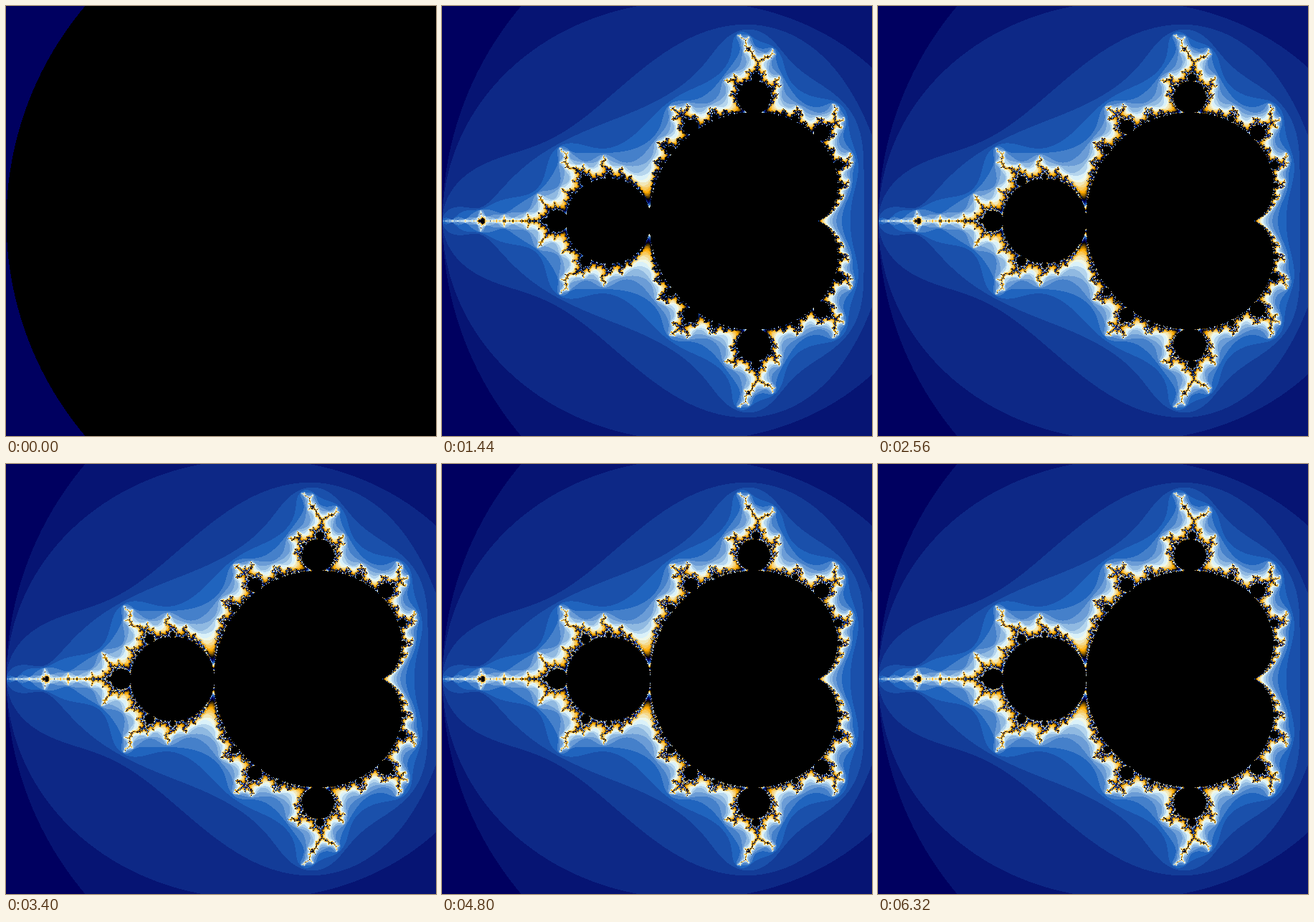
These frames come from a looping animation (600 by 600 pixels, 6.4 s). An HTML page with a canvas:

```html
<!DOCTYPE html>
<html lang="en">
<head>
<meta charset="utf-8">
<title>Mandelbrot set, growing iteration limit</title>
<style>
  html, body { margin: 0; width: 100%; height: 100%; overflow: hidden; background: #000; }
  canvas { display: block; width: 600px; height: 600px; }
</style>
</head>
<body>
<canvas id="stage" width="600" height="600"></canvas>
<script>
const SIZE = 600, SCALE = 232, MAX = 200, PERIOD = 25;
const LOOP = 6400, TICK = 40, HOLD = 320, STEP = 30;
const BLACK = 0xff000000;

// One colour cycle: navy, blue, white, orange, black and back
const stops = [
  { at: 0, rgb: [0, 0, 96] },
  { at: 0.2, rgb: [32, 100, 190] },
  { at: 0.42, rgb: [237, 255, 255] },
  { at: 0.64, rgb: [255, 170, 0] },
  { at: 0.86, rgb: [0, 2, 0] },
  { at: 1, rgb: [0, 0, 96] }
];

// Cyclic gradient colour of an iteration count, packed as ABGR
function colour(count) {
  const pos = (count - 1) % PERIOD / PERIOD;
  const i = stops.findIndex(stop => stop.at > pos);
  const a = stops[i - 1], b = stops[i];
  const f = (pos - a.at) / (b.at - a.at);
  const [red, green, blue] = a.rgb.map((v, j) => Math.round(v + (b.rgb[j] - v) * f));
  return (BLACK | blue << 16 | green << 8 | red) >>> 0;
}

// Iterations until |z| > 2, or MAX + 1 for points that stay
function escapeCount(cx, cy) {
  let x = 0, y = 0;
  for (let k = 1; k <= MAX; k++) {
    const next = x * x - y * y + cx;
    y = 2 * x * y + cy;
    x = next;
    if (x * x + y * y > 4) return k;
  }
  return MAX + 1;
}

// The lower half mirrors the upper one
const counts = new Uint8Array(SIZE * SIZE);
for (let row = 0; row < SIZE / 2; row++) {
  const cy = (SIZE / 2 - row - 0.5) / SCALE;
  for (let col = 0; col < SIZE; col++) {
    const k = escapeCount(col / SCALE - 2, cy);
    counts[row * SIZE + col] = counts[(SIZE - 1 - row) * SIZE + col] = k;
  }
}

const palette = Array.from({ length: MAX + 2 }, (_, k) => k ? colour(k) : BLACK);
const ctx = document.getElementById("stage").getContext("2d");
const image = ctx.createImageData(SIZE, SIZE);
const pixels = new Uint32Array(image.data.buffer);
let shown = 0;

function draw() {
  const time = Math.floor(performance.now() % LOOP / TICK) * TICK;
  const limit = Math.min(MAX, 1 + Math.floor(Math.max(0, time - HOLD) / STEP));
  if (limit !== shown) {
    shown = limit;
    for (let i = 0; i < pixels.length; i++) {
      pixels[i] = counts[i] <= limit ? palette[counts[i]] : BLACK;
    }
    ctx.putImageData(image, 0, 0);
  }
  requestAnimationFrame(draw);
}
draw();
</script>
</body>
</html>
```
